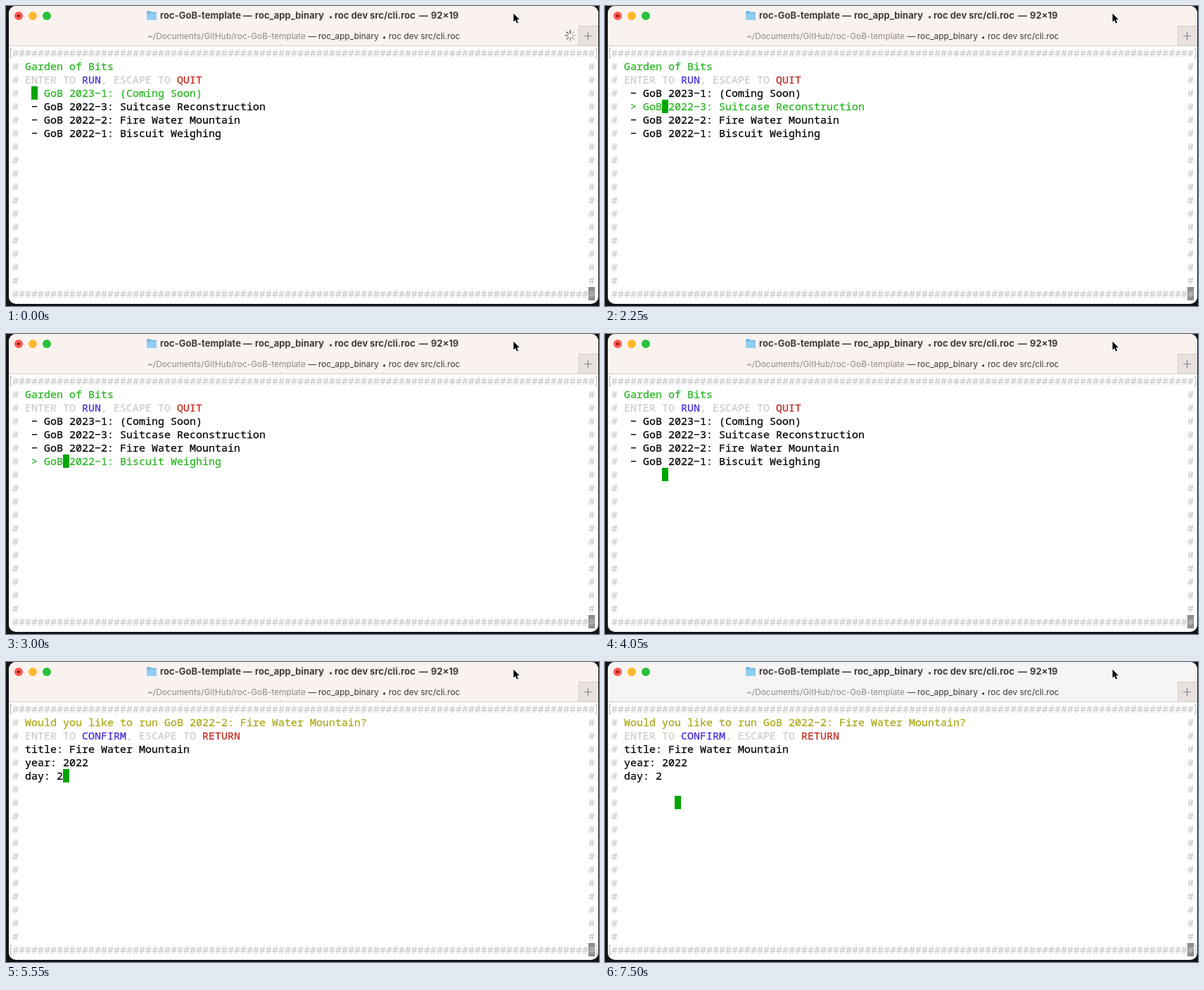
Write an HTML page that moves like this. It is 843x426 px and loops after 8000 ms.

```html
<!DOCTYPE html>
<html lang="en">
<head>
<meta charset="utf-8">
<title>Terminal menu</title>
<style>
  html, body { margin: 0; width: 100%; height: 100%; overflow: hidden; background: #141414; }
  svg { display: block; width: 843px; height: 426px; }
  text { white-space: pre; }
  .ui { font-family: Inter, "DejaVu Sans", sans-serif; }
  .title { font-size: 13px; font-weight: 700; fill: #403c3b; }
  .tab { font-size: 11.9px; fill: #3b3736; }
  .tab .path { fill: #918b89; }
  .arrow { font-size: 8px; }
  #term { font: 500 15px "Noto Sans Mono", "Liberation Mono", monospace; }
  #bar { fill: #faf2ef; }
  #bar.settled { fill: #f7f5f4; }
</style>
</head>
<body>
<svg viewBox="0 0 843 426" xmlns="http://www.w3.org/2000/svg">
  <defs><clipPath id="frame"><rect x="4" width="838" height="423" rx="10"/></clipPath></defs>
  <g clip-path="url(#frame)">
    <rect width="843" height="426" fill="#fff"/>
    <rect id="bar" width="843" height="56"/>
    <rect x="814" y="28" width="29" height="28" fill="#e8e1de"/>
    <path d="M814.5 56V28.5H843M4 56.5H843" fill="none" stroke="#d3ccc9"/>
    <path d="M822 42.5H833M827.5 37V48" stroke="#858080" stroke-width="1.2"/>
  </g>

  <circle cx="18" cy="14" r="6" fill="#fe5850"/>
  <circle cx="18" cy="14" r="2" fill="#7c130c"/>
  <circle cx="38" cy="14" r="6" fill="#fdb92c"/>
  <circle cx="58" cy="14" r="6" fill="#28c23c"/>

  <path d="M200 8.5q0-1.5 1.5-1.5h3.5l1.5 1.5h6q1.5 0 1.5 1.5v8.5q0 1.5-1.5 1.5h-11q-1.5 0-1.5-1.5z" fill="#70b9e2"/>
  <path d="M200 10.5h14v8q0 1.5-1.5 1.5h-11q-1.5 0-1.5-1.5z" fill="#91cff1"/>

  <text class="ui title" y="18"><tspan x="219">roc-GoB-template</tspan><tspan x="337">—</tspan><tspan x="354">roc_app_binary</tspan><tspan class="arrow" x="459">◂</tspan><tspan x="467">roc dev src/cli.roc</tspan><tspan x="587">—</tspan><tspan x="604">92×19</tspan></text>
  <text class="ui tab" y="46.5"><tspan class="path" x="201">~/Documents/GitHub/roc-GoB-template</tspan><tspan x="429.5">—</tspan><tspan x="444">roc_app_binary</tspan><tspan class="arrow" x="535">◂</tspan><tspan x="544">roc dev src/cli.roc</tspan></text>

  <g id="spinner" stroke-width="1.6" stroke-linecap="round"></g>
  <g id="term"></g>
  <path d="M721.5 10.5V22.5L724.2 20L726.3 24.6L728.2 23.8L726.2 19.2H730Z" fill="#000" stroke="#fff" stroke-width="2" stroke-linejoin="round" paint-order="stroke"/>
</svg>

<script>
const LOOP = 8000, CELL_W = 9, CELL_H = 19, LEFT = 9, TOP = 57, COLS = 92, ROWS = 19;
const GREY = '#c4c4c4', GREEN = '#27b41f', BLUE = '#4a28da', RED = '#c42a1e', YELLOW = '#aaa614', BLACK = '#000';
const MENU_TOP = 3, CONFIRM_AT = 5550, SETTLE_AT = 6900, SPIN_END = 450, SPIN_STEP = 150;

const entries = [
  'GoB 2023−1: (Coming Soon)',
  'GoB 2022−3: Suitcase Reconstruction',
  'GoB 2022−2: Fire Water Mountain',
  'GoB 2022−1: Biscuit Weighing'
];

// time, caret row, caret column
const steps = [
  [0, 3, 3], [450, 3, 4], [900, 4, 5], [1650, 4, 6], [1950, 4, 7], [2250, 4, 8],
  [2550, 5, 8], [3000, 6, 8], [4050, 7, 8], [4650, 6, 8], [4950, 5, 8], [CONFIRM_AT, 5, 8],
  [6900, 5, 9], [7050, 6, 9], [7350, 6, 10], [7500, 7, 10]
];

const $ = id => document.getElementById(id);
const term = $('term'), spinner = $('spinner'), bar = $('bar');

function add(parent, tag, attrs, text = '') {
  const node = document.createElementNS('http://www.w3.org/2000/svg', tag);
  for (const key in attrs) node.setAttribute(key, attrs[key]);
  node.textContent = text;
  parent.append(node);
}

const cellX = col => LEFT + col * CELL_W;
const cellY = row => TOP + row * CELL_H;

function write(row, col, text, fill) {
  const weight = fill === GREY ? 0 : 0.25;
  add(term, 'text', { x: cellX(col), y: cellY(row) + 15, fill, stroke: fill, 'stroke-width': weight }, text);
}

function block(row, col, fill) {
  add(term, 'rect', { x: cellX(col), y: cellY(row), width: CELL_W, height: CELL_H, fill });
}

function brackets(row) {
  const y = cellY(row) + 3.5;
  add(term, 'path', {
    d: `M9 ${y}H6.5v13H9M837.5 ${y}h2.5v13h-2.5`, fill: 'none', stroke: '#b5b5b5'
  });
}

function drawBorder() {
  const line = '#'.repeat(COLS);
  write(0, 0, line, GREY);
  write(ROWS - 1, 0, line.slice(1), GREY);
  for (let row = 1; row < ROWS - 1; row++) {
    write(row, 0, '#', GREY);
    write(row, COLS - 1, '#', GREY);
  }
  block(ROWS - 1, COLS - 1, '#8c8c8c');
  write(ROWS - 1, COLS - 1, '#', GREY);
  brackets(0);
}

function drawHint(enter, escape) {
  const comma = 11 + enter.length;
  write(2, 2, 'ENTER TO', GREY);
  write(2, 11, enter, BLUE);
  write(2, comma, ', ESCAPE TO', GREY);
  write(2, comma + 12, escape, RED);
}

function drawMenu(selectedRow) {
  write(1, 2, 'Garden of Bits', GREEN);
  drawHint('RUN', 'QUIT');
  entries.forEach((entry, i) => {
    const row = MENU_TOP + i, on = row === selectedRow;
    write(row, 3, (on ? '> ' : '− ') + entry, on ? GREEN : BLACK);
  });
}

function drawConfirm() {
  write(1, 2, `Would you like to run ${entries[2]}?`, YELLOW);
  drawHint('CONFIRM', 'RETURN');
  ['title: Fire Water Mountain', 'year: 2022', 'day: 2']
    .forEach((line, i) => write(3 + i, 2, line, BLACK));
  brackets(ROWS - 1);
}

function drawTerminal([time, row, col]) {
  term.replaceChildren();
  drawBorder();
  if (time < CONFIRM_AT) drawMenu(row);
  else drawConfirm();
  block(row, col, '#00a600');
}

function drawSpinner(phase) {
  spinner.replaceChildren();
  if (phase < 0) return;
  for (let i = 0; i < 8; i++) {
    const age = (phase - i + 16) % 8;
    add(spinner, 'path', {
      d: 'M0 -3.5V-7', transform: `translate(802 42) rotate(${i * 45})`,
      stroke: '#5d5856', opacity: 1 - age * 0.09
    });
  }
}

let lastStep, lastPhase;
function tick() {
  const t = performance.now() % LOOP;
  const step = steps.findLast(s => s[0] <= t);
  const phase = t < SPIN_END ? Math.floor(t / SPIN_STEP) : -1;
  if (step !== lastStep) drawTerminal(lastStep = step);
  if (phase !== lastPhase) drawSpinner(lastPhase = phase);
  bar.classList.toggle('settled', t >= SETTLE_AT);
  requestAnimationFrame(tick);
}
tick();
</script>
</body>
</html>
```
